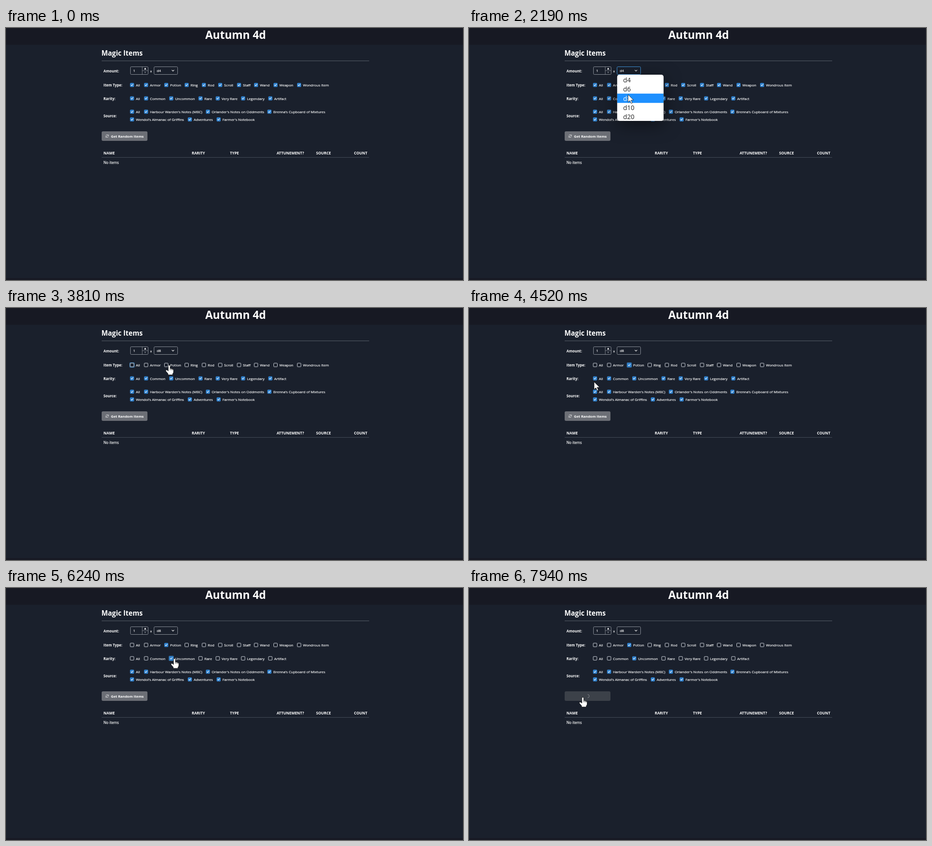
These frames come from a looping animation (1008 by 556 pixels, 7990 ms). An HTML page:

```html
<!DOCTYPE html>
<html lang="en">
<head>
<meta charset="utf-8">
<title>Magic Items</title>
<style>
  html, body { margin: 0; width: 100%; height: 100%; overflow: hidden; background: #1a202c; }
  svg { display: block; width: 1008px; height: 556px; font: 7.95px "Open Sans", "Noto Sans", sans-serif; fill: #fff; }
  text { stroke: #fff; stroke-width: .18; }
  .bold, .bold text, .head text { font-weight: 700; stroke: none; }
  .head { font-size: 8.25px; }
  .line { fill: none; stroke: #fff; stroke-linecap: round; stroke-linejoin: round; }
  .field { fill: none; stroke: #8d929b; }
  .option { font-size: 14.2px; stroke: none; }
  #popup { filter: drop-shadow(0 8px 18px rgba(0, 0, 0, .5)); }
  #pointer path { fill: #fff; stroke: #111; stroke-width: .8; stroke-linejoin: round; }
</style>
</head>
<body>
<svg viewBox="0 0 1008 556">
  <rect width="1008" height="556" fill="#1a202c"/>
  <rect width="1008" height="37" fill="#171923"/>
  <rect y="552" width="1008" height="4" fill="#171923"/>
  <text class="bold" x="506.4" y="23.6" font-size="24.2" text-anchor="middle">Autumn 4d</text>
  <text class="bold" x="210.5" y="61" font-size="15.1">Magic Items</text>
  <path d="M211 72.5H801" stroke="#59606b"/>
  <path d="M211 285.5H801" stroke="#454c58"/>

  <g class="bold">
    <text x="215" y="97.7">Amount:</text>
    <text x="215" y="129">Item Type:</text>
    <text x="215" y="158.7">Rarity:</text>
    <text x="215" y="196.5">Source:</text>
  </g>

  <rect class="field" x="274.5" y="85.5" width="39" height="17" rx="2"/>
  <path class="field" d="M300.5 85.5V102.5M300.5 94H313.5" stroke-width=".8"/>
  <path d="M304.6 91.4L307 87.6L309.4 91.4Z"/>
  <path d="M304.9 96.8L307 99.8L309.1 96.8Z" fill="#777c86"/>
  <text x="280.6" y="97">1</text>
  <text x="317.7" y="97.7">x</text>
  <rect class="field" id="select" x="326.5" y="85.5" width="52" height="17" rx="2"/>
  <text id="dice" x="332.5" y="97"></text>
  <path class="line" d="M366 92.9L368.3 95.2L370.6 92.9" stroke-width="1.1"/>

  <g id="boxes"></g>

  <rect id="face" x="211" y="228" width="101" height="21" rx="3"/>
  <g id="caption">
    <g class="line" stroke-width=".8">
      <path d="M220.4 237.5A2.9 2.9 0 0 1 225.7 237.1M225.8 239.4A2.9 2.9 0 0 1 220.5 239.8"/>
      <path d="M226 235.8V237.4H224.4M220.2 241.1V239.5H221.8"/>
    </g>
    <text class="bold" x="231.5" y="241.6" font-size="7.8">Get Random Items</text>
  </g>
  <path id="spinner" class="line" d="M-2.6 -2.6A3.7 3.7 0 0 1 2.6 2.6" stroke-width=".9" opacity=".4"/>

  <g class="head">
    <text x="215" y="278.8">NAME</text>
    <text x="409.7" y="278.8">RARITY</text>
    <text x="494" y="278.8">TYPE</text>
    <text x="597" y="278.8">ATTUNEMENT?</text>
    <text x="684" y="278.8">SOURCE</text>
    <text x="767.6" y="278.8">COUNT</text>
  </g>
  <text x="215" y="300" font-size="8.1">No items</text>

  <g id="popup">
    <rect x="326.8" y="103" width="102.4" height="102" rx="5" fill="#fff"/>
    <g id="options"></g>
  </g>

  <g id="pointer">
    <path id="arrow" d="M0 0V16.6L3.9 13L6.7 19.4L9.3 18.3L6.5 12.1H12Z"/>
    <g id="hand">
      <path d="M-2 2A2 2 0 0 1 2 2V7.5Q4 6.6 4.8 8.2Q6.9 7.5 7.3 9.1Q9.5 8.7 9.5 11V15Q9.5 17.6 7.6 19V21.4H-2.6V19Q-4 17 -7 14Q-8.4 11.6 -6.6 10.7Q-4.6 10.3 -2 13.1Z"/>
      <path d="M2 7.5V11M4.8 8.2V11.2M7.3 9.1V11.6"/>
    </g>
  </g>
</svg>

<script>
const LOOP = 7990;
const $ = id => document.getElementById(id);

function add(parent, tag, attrs, text = '') {
  const node = document.createElementNS('http://www.w3.org/2000/svg', tag);
  for (const key in attrs) node.setAttribute(key, attrs[key]);
  node.textContent = text;
  return parent.appendChild(node);
}
const show = (node, visible) => node.setAttribute('visibility', visible ? 'visible' : 'hidden');
const within = (t, [from, to]) => t >= from && t < to;

// Each row: centre y, time it is cleared, then the boxes by centre x.
const rows = [
  { y: 126, off: 2940, items: [[278, 'All'], [309, 'Armor'], [353.5, 'Potion'], [398.5, 'Ring'], [436.5, 'Rod'],
    [472.5, 'Scroll'], [514, 'Staff'], [551.5, 'Wand'], [594.5, 'Weapon'], [646.5, 'Wondrous Item']] },
  { y: 155.5, off: 5425, items: [[278, 'All'], [309, 'Common'], [364.5, 'Uncommon'], [429, 'Rare'],
    [467, 'Very Rare'], [523, 'Legendary'], [583, 'Artifact']] },
  { y: 185, off: Infinity, items: [[278, 'All'], [309, "Harbour Warden's Notes (MBC)"],
    [445.3, "Orlander's Notes on Oddments"], [581, "Brenna's Cupboard of Mixtures"]] },
  { y: 202, off: Infinity, items: [[278, "Wendol's Almanac of Griffins"], [405.5, 'Adventures'],
    [469, "Farmer's Notebook"]] }
];

// Times at which single boxes are ticked, and spans in which they hold focus.
const ticked = { Potion: 3850, Uncommon: 6160 };
const focus = { Potion: [3850, 4700], Uncommon: [6160, 7580] };
const firstFocus = [[2940, 3850], [5470, 6160]];

const boxes = rows.flatMap(({ y, off, items }, r) => items.map(([x, label], i) => {
  const g = add($('boxes'), 'g', { transform: `translate(${x} ${y - .3})` });
  const box = {
    off,
    on: ticked[label] || Infinity,
    span: focus[label] || (i === 0 && firstFocus[r]) || [0, 0],
    ring: add(g, 'rect', { x: -5.7, y: -5.7, width: 11.4, height: 11.4, rx: 2, fill: '#4299e1', 'fill-opacity': .6 }),
    face: add(g, 'rect', { x: -4, y: -4, width: 8, height: 8, rx: 1 }),
    tick: add(g, 'path', { class: 'line', d: 'M-2.1 .1L-.6 1.7L2.2 -1.7', 'stroke-width': 1.1 })
  };
  add(g, 'text', { x: 8.5, y: 3.3 }, label);
  return box;
}));

const ROW = 20.4;
const options = ['d4', 'd6', 'd8', 'd10', 'd20'].map((name, i) => {
  const top = 104 + ROW * i, bottom = top + ROW;
  const edge = i ? `${top}H429` : '108Q327 103.5 331.5 103.5H424.5Q429 103.5 429 108';
  return {
    back: add($('options'), 'path', { d: `M327 ${bottom}V${edge}V${bottom}Z`, fill: '#1e90ff' }),
    text: add($('options'), 'text', { class: 'option', x: 340, y: top + 15.8 }, name)
  };
});

// Pointer stops: time, x, y.
const path = [
  [290, 720, 423], [570, 341, 94], [720, 343, 94], [900, 352, 96], [1330, 355, 118], [1480, 355, 122],
  [1560, 355, 122], [2000, 352, 146], [2370, 350, 148], [2780, 275, 129], [3050, 291, 128], [3200, 291, 128],
  [3600, 367, 131], [3800, 360, 126], [4010, 360, 126], [4520, 276, 163], [4650, 265, 165], [4850, 270, 163],
  [5050, 299, 146], [5280, 284, 152], [5430, 284, 152], [5940, 376, 152], [6140, 376, 152],
  [6900, 285, 231], [6950, 285, 231], [7450, 252, 241], [7760, 251, 241], [7990, 251, 241]
];
function position(t) {
  const i = Math.max(1, path.findIndex(p => p[0] > t));
  const [t0, x0, y0] = path[i - 1], [t1, x1, y1] = path[i];
  const k = (t - t0) / (t1 - t0), s = k * k * (3 - 2 * k);
  return [x0 + (x1 - x0) * s, y0 + (y1 - y0) * s];
}

const OPEN = [850, 2200], LOADING = 7600;

function draw(t) {
  const [x, y] = position(t);
  const open = within(t, OPEN);
  const loading = t >= LOADING;
  const visible = t >= path[0][0];
  const onButton = x > 211 && x < 312 && y > 228 && y < 249;
  const onLabel = t > 2370 && x > 273 && rows.some(row => Math.abs(y - row.y) < 6.5);
  const pointing = onLabel || onButton;

  $('pointer').setAttribute('transform', `translate(${x} ${y})`);
  show($('hand'), visible && pointing);
  show($('arrow'), visible && !pointing);

  $('select').style.stroke = within(t, [720, 2900]) ? '#4299e1' : '';
  $('dice').textContent = t < OPEN[1] ? 'd4' : 'd8';
  $('popup').style.display = open ? '' : 'none';
  const active = Math.max(0, Math.floor((y - 104) / ROW));
  options.forEach(({ back, text }, i) => {
    back.style.display = i === active ? '' : 'none';
    text.setAttribute('fill', i === active ? '#fff' : '#222');
  });

  for (const { off, on, span, ring, face, tick } of boxes) {
    const checked = t < off || t >= on;
    face.setAttribute('fill', checked ? '#3182ce' : '#1a202c');
    face.setAttribute('stroke', checked ? '#3182ce' : '#d5dae2');
    tick.setAttribute('opacity', checked ? 1 : Math.max(0, 1 - (t - off) / 160));
    show(ring, within(t, span));
  }

  $('face').setAttribute('fill', loading ? '#3c4149' : onButton ? '#818388' : '#6c6f76');
  show($('caption'), !loading);
  show($('spinner'), loading);
  $('spinner').setAttribute('transform', `translate(262 238.5) rotate(${45 + (t - 7940) * 360 / 450})`);
}

const start = performance.now();
function frame() {
  draw((performance.now() - start) % LOOP);
  requestAnimationFrame(frame);
}
frame();
</script>
</body>
</html>
```
